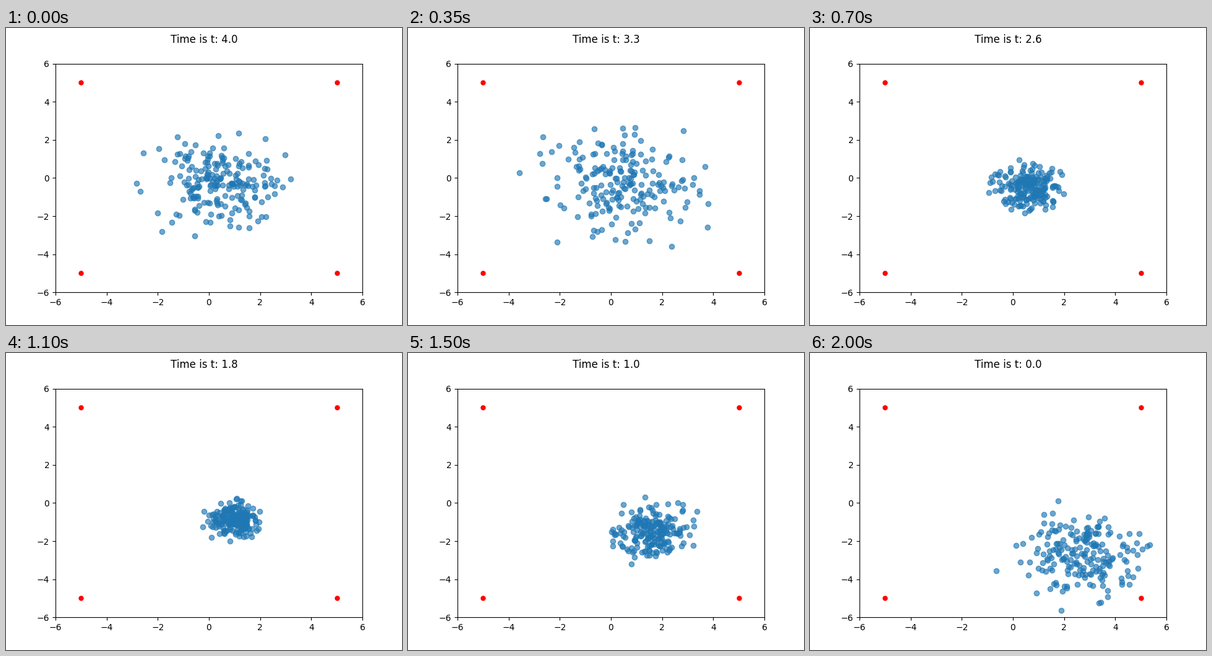
Animation, 640 px wide and 480 px high, one loop 2050 ms. Source, as a matplotlib script:

```python
import numpy as np
import matplotlib.pyplot as plt
from matplotlib.animation import FuncAnimation

FRAMES, COUNT = 41, 200
MEMORY = 0.93                     # how much of its offset a particle keeps per step
START = np.array([0.4, -0.25])    # cloud centre at the first and last step
END = np.array([2.7, -2.7])
ASPECT = np.array([1, 0.94])      # the cloud is slightly flatter than wide


def diffuse(rng):
    """Mean-reverting random walk with unit variance, shape (frame, particle, 2)."""
    z = rng.normal(size=(FRAMES, COUNT, 2))
    for i in range(1, FRAMES):
        z[i] = MEMORY * z[i - 1] + np.sqrt(1 - MEMORY**2) * z[i]
    # Pull far strays in softly, then centre and rescale each step
    r = np.linalg.norm(z, axis=-1, keepdims=True)
    z /= np.hypot(1, r / 5)
    return (z - z.mean(axis=1, keepdims=True)) / z.std(axis=1, keepdims=True)


def simulate():
    step = np.arange(FRAMES)
    drift = (step / (FRAMES - 1)) ** 2.3
    centre = START + np.outer(drift, END - START)
    # The cloud swells, collapses to a tight core, then opens again
    size = np.interp(step, [0, 4, 7, 10, 14, 22, 30, 40],
                     [1.15, 1.4, 1.4, 0.95, 0.6, 0.45, 0.7, 1.1])
    spread = np.outer(size, ASPECT)
    return centre[:, None] + spread[:, None] * diffuse(np.random.default_rng(4))


cloud = simulate()

fig, ax = plt.subplots(figsize=(6.4, 4.8), dpi=100)
ax.set(xlim=(-6, 6), ylim=(-6, 6))
title = fig.suptitle("")
dots, = ax.plot([], [], "o", color="tab:blue", alpha=0.65)
ax.plot([-5, -5, 5, 5], [-5, 5, -5, 5], "ro", markersize=5)


def update(i):
    dots.set_data(cloud[i, :, 0], cloud[i, :, 1])
    title.set_text(f"Time is t: {(FRAMES - 1 - i) / 10:.1f}")
    return dots, title


anim = FuncAnimation(fig, update, frames=FRAMES, interval=50, repeat=True, repeat_delay=0)
plt.show()
```
